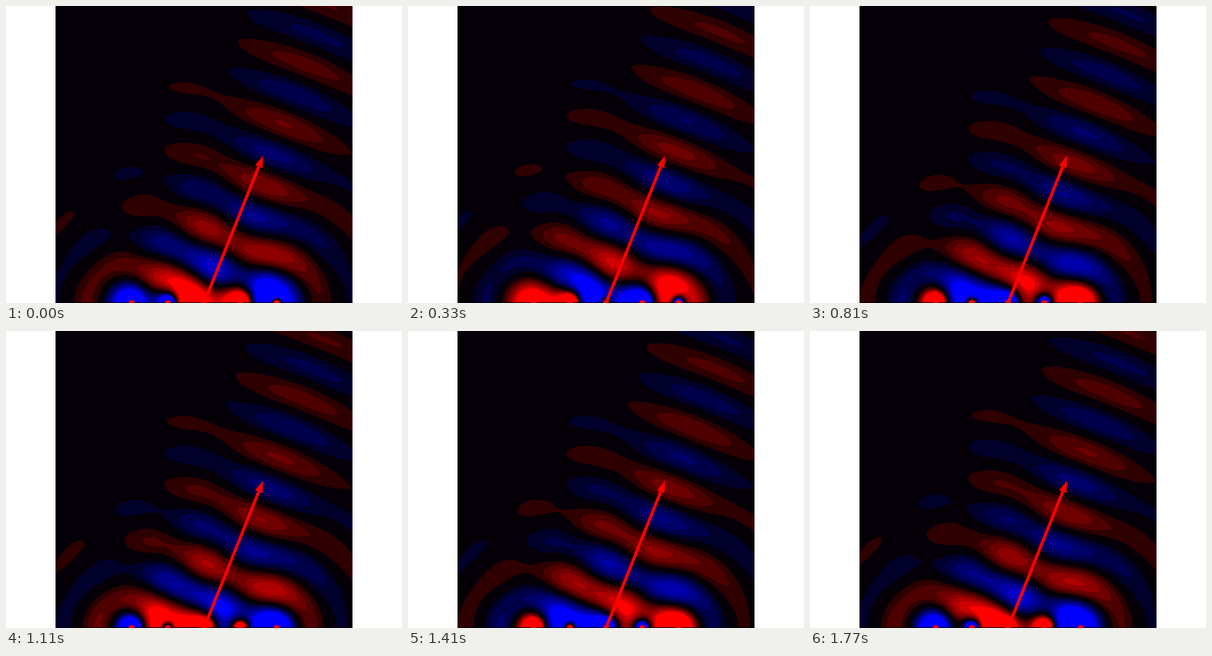
An HTML page with a canvas for the animation above (1800 ms loop, 640 by 480 pixels).

```html
<!DOCTYPE html>
<html lang="en">
<head>
<meta charset="utf-8">
<title>Phased array</title>
<style>
  html, body { margin: 0; width: 100%; height: 100%; overflow: hidden; background: #fff; }
  canvas { display: block; position: absolute; left: 0; top: 0; }
</style>
</head>
<body>
<canvas id="stage" width="640" height="480"></canvas>
<script>
const SIZE = 480, LEFT = 80, CENTER = 320, BASE = 480;
const SPACING = 58.54, WAVELENGTH = 100.3;
const STEP_MS = 30, STEPS = 20;          // one wave period is 20 steps
const BAND = 0.0045, TOP = 7;            // field strength per colour band
const DIR = { x: 0.3714, y: -0.9285 };   // steering direction
const TIP = { x: 415.5, y: 242 };

const ctx = document.getElementById('stage').getContext('2d');
const emitters = [-2, -1, 0, 1, 2].map(n => n * SPACING);

// Sum of the spherical waves at each pixel, split into two quadratures.
const re = new Float32Array(SIZE * SIZE);
const im = new Float32Array(SIZE * SIZE);
for (let y = 0, i = 0; y < SIZE; y++) {
  for (let x = 0; x < SIZE; x++, i++) {
    const px = x + 0.5 + LEFT - CENTER, py = BASE - y - 0.5;
    for (const e of emitters) {
      const r = Math.hypot(px - e, py);
      const phase = 2 * Math.PI * (r + e * DIR.x) / WAVELENGTH;
      re[i] += Math.cos(phase) / r;
      im[i] += Math.sin(phase) / r;
    }
  }
}

// Colours from full blue through near-black to full red.
const rgb = (r, g, b) => (255 << 24 | b << 16 | g << 8 | r) >>> 0;
const palette = new Uint32Array(2 * TOP + 1);
palette[TOP] = rgb(5, 0, 7);
for (let n = 1; n <= TOP; n++) {
  palette[TOP + n] = rgb(n === TOP ? 255 : 32 * n + 14, 0, 0);
  palette[TOP - n] = rgb(0, 0, n === TOP ? 255 : 32 * n + 10);
}

const image = ctx.createImageData(SIZE, SIZE);
const pixels = new Uint32Array(image.data.buffer);

function drawField(step) {
  const a = 2 * Math.PI * step / STEPS;
  const c = Math.cos(a) / BAND, s = Math.sin(a) / BAND;
  for (let i = 0; i < pixels.length; i++) {
    const level = Math.trunc(im[i] * c - re[i] * s);
    pixels[i] = palette[TOP + Math.max(-TOP, Math.min(TOP, level))];
  }
  ctx.putImageData(image, LEFT, 0);
  ctx.fillStyle = '#000';
  ctx.fillRect(LEFT, BASE - 1, SIZE, 1);
}

function drawArray() {
  ctx.fillStyle = ctx.strokeStyle = '#f00';
  for (const e of emitters) {
    ctx.beginPath();
    ctx.arc(CENTER + e + 0.3, BASE, 4.8, 0, 2 * Math.PI);
    ctx.fill();
  }
  const neck = { x: TIP.x - 19 * DIR.x, y: TIP.y - 19 * DIR.y };
  ctx.lineWidth = 5;
  ctx.beginPath();
  ctx.moveTo(CENTER, BASE);
  ctx.lineTo(neck.x, neck.y);
  ctx.stroke();
  ctx.beginPath();
  ctx.moveTo(TIP.x, TIP.y);
  ctx.lineTo(neck.x - 6.5 * DIR.y, neck.y + 6.5 * DIR.x);
  ctx.lineTo(neck.x + 6.5 * DIR.y, neck.y - 6.5 * DIR.x);
  ctx.fill();
}

let shown = -1;
function render(now) {
  const step = Math.floor(now / STEP_MS) % STEPS;
  if (step !== shown) {
    shown = step;
    drawField(step);
    drawArray();
  }
}

const start = performance.now();
function tick() {
  render(Math.max(0, performance.now() - start));
  requestAnimationFrame(tick);
}
tick();
</script>
</body>
</html>
```
